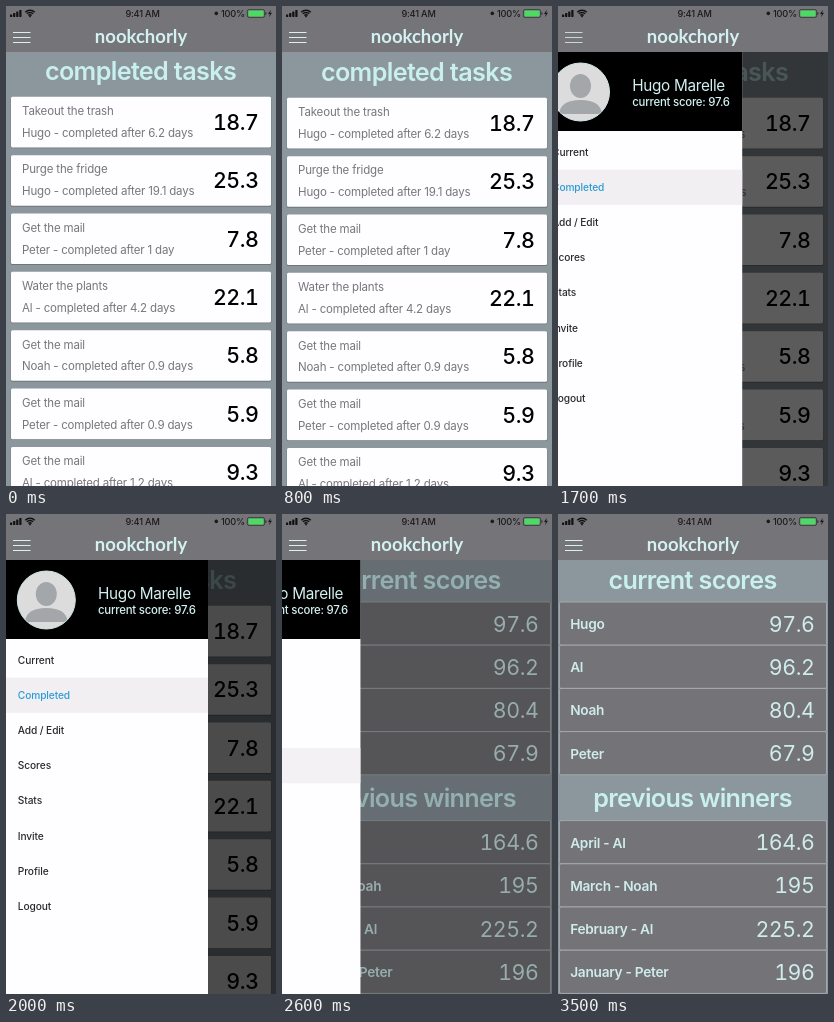
These frames come from a looping animation (270 by 480 pixels, 8 s). An HTML page:

```html
<!DOCTYPE html>
<html lang="en">
<head>
<meta charset="utf-8">
<title>Household tasks</title>
<style>
  html, body { margin: 0; width: 100%; height: 100%; overflow: hidden; background: #8b979d; }
  svg { display: block; width: 100%; height: 100%; font-family: Inter, Roboto, sans-serif; }
  text { letter-spacing: -.02em; white-space: pre; }
  .title { font-size: 25.2px; font-weight: 600; letter-spacing: -.026em; text-anchor: middle; fill: #c9f0ef; }
  .line { font-size: 11.5px; letter-spacing: -.014em; fill: #77767a; }
  .points, .score { font-size: 21.4px; text-anchor: end; font-variant-numeric: tabular-nums; }
  .points { font-weight: 500; fill: #000; }
  .score { fill: #cfecec; }
  .label { font-size: 13.7px; font-weight: 600; fill: #cfecec; }
  .item { font-size: 10.2px; font-weight: 500; letter-spacing: -.01em; fill: #2a292c; }
  .name { font-size: 15.3px; fill: #d3f1f1; }
  .total { font-size: 11.4px; font-weight: 500; fill: #d3f1f1; }
  .brand { font: 700 18.5px Lato, sans-serif; letter-spacing: 0; text-anchor: middle; fill: #d3f1f1; }
  .status { font-size: 9.2px; font-weight: 500; fill: #1b1a1c; }
</style>
</head>
<body>
<svg id="stage" viewBox="0 0 270 480"></svg>
<script>
const LOOP = 8000, STEP = 100;
const MENU_W = 202, SLIDE = 328, OPEN_AT = 1497, CLOSE_AT = 2510, SWITCH_AT = 2400;
const stage = document.getElementById('stage');

function add(parent, tag, attrs = {}, content) {
  const node = document.createElementNS('http://www.w3.org/2000/svg', tag);
  for (const key in attrs) node.setAttribute(key, attrs[key]);
  if (content !== undefined) node.textContent = content;
  parent.append(node);
  return node;
}
const group = parent => add(parent, 'g');
const rect = (parent, x, y, width, height, fill, more) =>
  add(parent, 'rect', { x, y, width, height, fill, ...more });
const text = (parent, cls, x, y, content) => add(parent, 'text', { class: cls, x, y }, content);

function buildTasks(page) {
  const tasks = [
    ['Takeout the trash', 'Hugo', '6.2 days', '18.7'],
    ['Purge the fridge', 'Hugo', '19.1 days', '25.3'],
    ['Get the mail', 'Peter', '1 day', '7.8'],
    ['Water the plants', 'Al', '4.2 days', '22.1'],
    ['Get the mail', 'Noah', '0.9 days', '5.8'],
    ['Get the mail', 'Peter', '0.9 days', '5.9'],
    ['Get the mail', 'Al', '1.2 days', '9.3'],
  ];
  text(page, 'title', 134.5, 75.2, 'completed tasks');
  tasks.forEach(([task, who, time, points], i) => {
    const y = 91.8 + i * 58.35;
    rect(page, 4.7, y + .9, 260.6, 50.6, '#000', { rx: 1.5, opacity: .22 });
    rect(page, 5, y, 260, 50.6, '#fefdff', { rx: 1.5 });
    text(page, 'line', 16, y + 18.3, task);
    text(page, 'line', 16, y + 40.2, `${who} - completed after ${time}`);
    text(page, 'points', 252.5, y + 33.2, points);
  });
}

function buildScores(page) {
  const lists = [
    ['current scores', 88, [['Hugo', '97.6'], ['Al', '96.2'], ['Noah', '80.4'], ['Peter', '67.9']]],
    ['previous winners', 306.6, [['April - Al', '164.6'], ['March - Noah', '195'],
      ['February - Al', '225.2'], ['January - Peter', '196']]],
  ];
  for (const [title, top, rows] of lists) {
    text(page, 'title', 134.5, top - 13.2, title);
    rows.forEach(([label, score], i) => {
      const y = top + i * 43.2;
      rect(page, 1.5, y, 267, 43.2, '#747377', { rx: 1.5, stroke: '#aab3b5', 'stroke-width': .8 });
      text(page, 'label', 12.2, y + 27, label);
      text(page, 'score', 256.5, y + 29.6, score);
    });
  }
}

function buildMenu(menu) {
  rect(menu, 0, 45, MENU_W, 435, '#fefdff');
  rect(menu, 0, 45, MENU_W, 80, '#000');
  const clip = add(add(menu, 'clipPath', { id: 'face' }), 'circle', { cx: 40.3, cy: 86, r: 28.5 });
  add(menu, 'circle', { cx: 40.3, cy: 86, r: 29, fill: '#dcdcdd', stroke: '#cfe6e7', 'stroke-width': 1 });
  const figure = add(menu, 'g', { 'clip-path': 'url(#face)', fill: '#a3a7a9' });
  add(figure, 'ellipse', { cx: 40.3, cy: 80, rx: 10.5, ry: 12 });
  add(figure, 'path', { d: 'M19 108 Q20 94 40.3 94 Q60.6 94 61.6 108Z' });
  text(menu, 'name', 92, 84.6, 'Hugo Marelle');
  text(menu, 'total', 92, 100, 'current score: 97.6');
  return ['Current', 'Completed', 'Add / Edit', 'Scores', 'Stats', 'Invite', 'Profile', 'Logout']
    .map((label, i) => {
      const y = 128.4 + i * 35.2;
      return {
        row: rect(menu, 0, y, MENU_W, 35.2, '#f1eff2', { opacity: 0 }),
        label: text(menu, 'item', 11.8, y + 21.1, label),
      };
    });
}

function buildHeader(bar) {
  rect(bar, 0, 0, 270, 46, '#757478');
  for (let i = 0; i < 4; i++) rect(bar, 4 + i * 3.1, 8.6 - i * 1.5, 2.2, 2.4 + i * 1.5, '#111', { rx: .4 });
  for (const r of [2.2, 4.4, 6.6]) {
    const d = r * .72;
    add(bar, 'path', {
      d: `M${24 - d} ${11 - d} A${r} ${r} 0 0 1 ${24 + d} ${11 - d}`,
      fill: 'none', stroke: '#111', 'stroke-width': 1.4,
    });
  }
  add(bar, 'circle', { cx: 24, cy: 10.4, r: .9, fill: '#111' });
  text(bar, 'status', 136.5, 10.6, '9:41 AM').setAttribute('text-anchor', 'middle');
  add(bar, 'circle', { cx: 210.3, cy: 7.4, r: 1.8, fill: '#1b1a1c' });
  text(bar, 'status', 239, 10.6, '100%').setAttribute('text-anchor', 'end');
  rect(bar, 241.4, 3.6, 17.2, 7.8, 'none', { rx: 1.6, stroke: '#2a2a2c', 'stroke-width': .7 });
  rect(bar, 242.4, 4.6, 15.2, 5.8, '#4cd964', { rx: .8 });
  rect(bar, 259.4, 6.2, 1, 2.6, '#2a2a2c', { rx: .5 });
  add(bar, 'path', { d: 'M264.8 3.8 L262 8 H263.8 L263 11.2 L266 6.8 H264.2Z', fill: '#1b1a1c' });
  text(bar, 'brand', 135, 37, 'nookchorly');
  return add(bar, 'path', { d: 'M7 26.5H24.5M7 31.5H24.5M7 36.5H24.5', stroke: '#dcefef', 'stroke-width': 1 });
}

rect(stage, 0, 0, 270, 480, '#8b979d');
const tasks = group(stage), scores = group(stage);
const shade = rect(stage, 0, 45, 270, 435, '#000');
const menu = group(stage);
buildTasks(tasks);
buildScores(scores);
const items = buildMenu(menu);
const burger = buildHeader(group(stage));

const clamp = v => Math.min(1, Math.max(0, v));
const span = (t, from, length) => clamp((t - from) / length);

// Same curve as cubic-bezier(0, 0, .2, 1)
function decelerate(x) {
  let lo = 0, hi = 1;
  for (let i = 0; i < 24; i++) {
    const s = (lo + hi) / 2;
    if (.6 * (1 - s) * s * s + s ** 3 < x) lo = s; else hi = s;
  }
  return lo * lo * (3 - 2 * lo);
}

// Linear interpolation through [time, value] pairs
function track(t, keys) {
  let [t0, v0] = keys[0];
  for (const [t1, v1] of keys) {
    if (t < t1) return v0 + (v1 - v0) * (t - t0) / (t1 - t0);
    [t0, v0] = [t1, v1];
  }
  return v0;
}

function render(t) {
  const open = decelerate(span(t, OPEN_AT, SLIDE)) - decelerate(span(t, CLOSE_AT, SLIDE));
  const switched = t >= SWITCH_AT;
  tasks.setAttribute('transform', `translate(0 ${span(t, 0, 300) - 1})`);
  tasks.style.display = switched ? 'none' : '';
  scores.style.display = switched ? '' : 'none';
  shade.setAttribute('opacity', .7 * open);
  menu.setAttribute('transform', `translate(${MENU_W * (open - 1)} 0)`);
  menu.style.display = open > .001 ? '' : 'none';
  items[1].row.setAttribute('opacity', switched ? 0 : 1);
  items[1].label.style.fill = switched ? '' : '#2a9bd4';
  items[3].row.setAttribute('opacity', span(t, 2440, 200));
  items[3].label.style.fill = switched ? '#cdeef0' : '';
  burger.setAttribute('opacity', track(t, [[0, 1], [1200, 1], [1400, .5], [1500, .5], [1700, .8], [1900, 1]]));
}

const start = performance.now();
function tick(now) {
  const t = Math.max(0, now - start) % LOOP;
  // The motion advances at ten pictures a second
  render(Math.floor((t + 15) / STEP) * STEP % LOOP);
  requestAnimationFrame(tick);
}
render(0);
requestAnimationFrame(tick);
</script>
</body>
</html>
```
